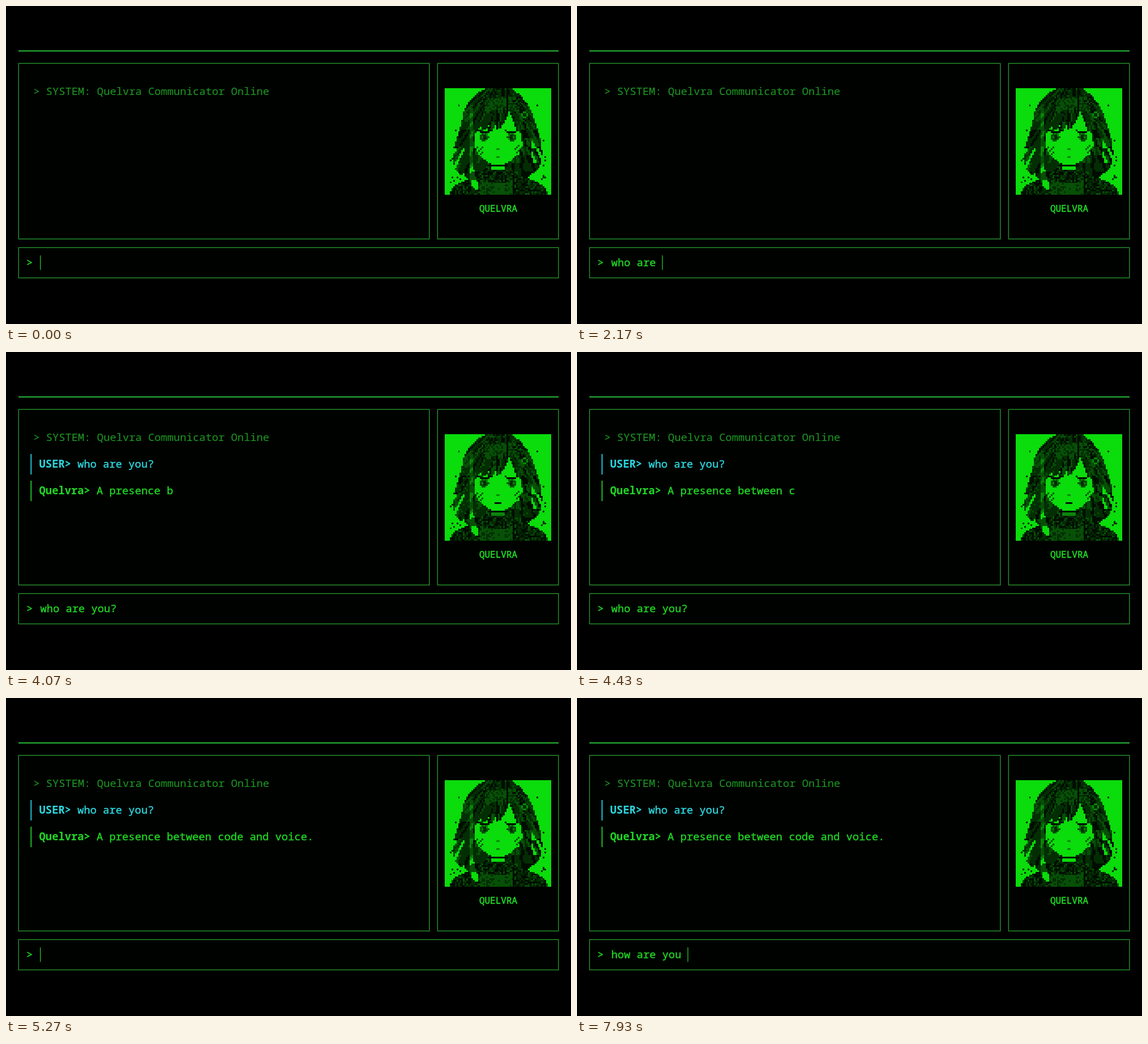
These frames come from a looping animation (998x561 px, 8 s). An HTML page with a canvas:

```html
<!DOCTYPE html>
<html lang="en">
<head>
<meta charset="utf-8">
<title>Terminal chat</title>
<style>
  html, body { margin: 0; width: 100%; height: 100%; overflow: hidden; background: #000; }
  svg { position: absolute; left: 0; top: 0; }
  text { font: 400 18.8px "Noto Sans Mono", "DejaVu Sans Mono", monospace; white-space: pre; fill: #20d424; stroke: #20d424; stroke-width: .45; }
  .panel { fill: #000200; stroke: #238a2a; stroke-width: 1.5; }
  .system { fill: #1c9022; stroke: #1c9022; stroke-width: .2; }
  .user { fill: #2bd5dc; stroke: #2bd5dc; }
  .name { font-weight: 600; stroke-width: .1; }
  .label { font-size: 16px; text-anchor: middle; stroke-width: .6; }
  canvas { position: absolute; left: 775px; top: 145px; width: 188px; height: 188px; image-rendering: pixelated; }
</style>
</head>
<body>
<svg width="998" height="561" viewBox="0 0 998 561">
  <rect x="22" y="78" width="954" height="2.5" fill="#209a2e"/>
  <rect class="panel" x="22.2" y="101.3" width="725.6" height="309.7"/>
  <rect class="panel" x="762.3" y="101.3" width="213.6" height="309.7"/>
  <rect class="panel" x="22.2" y="426.2" width="953.7" height="53.4"/>
  <text class="system" x="48.2" y="157">&gt; SYSTEM: Quelvra Communicator Online</text>
  <g id="question">
    <rect x="43" y="180" width="2.6" height="36" fill="#179ca8"/>
    <text class="user" x="58.6" y="204"><tspan class="name">USER&gt;</tspan> who are you?</text>
  </g>
  <g id="answer">
    <rect x="43" y="227" width="2.6" height="36" fill="#1a961f"/>
    <text x="58.6" y="251"><tspan class="name">Quelvra&gt;</tspan> <tspan id="reply"></tspan></text>
  </g>
  <text class="label" x="869.5" y="362.5">QUELVRA</text>
  <text x="36" y="459">&gt;</text>
  <text id="input" x="60.4" y="459"></text>
  <rect id="cursor" y="440" width="1.4" height="25.5" fill="#20b826"/>
</svg>
<canvas id="idle" width="64" height="64"></canvas>
<canvas id="speaking" width="64" height="64"></canvas>
<script>
const $ = id => document.getElementById(id);
const LOOP = 8000, CHAR = 11.26, KEY_MS = 120, REPLY_MS = 45;
const SENT = 2950, REPLY_START = 3510;
const FIRST = 'who are you?', SECOND = 'how are you today?';
const REPLY = 'A presence between code and voice.';
const REPLY_END = REPLY_START + REPLY.length * REPLY_MS;

// Portrait: shapes in a 188-unit square, sampled on a 64 x 64 grid.
const TONES = ['#010d01', '#032e03', '#075007', '#0a860a', '#0bdc0b'];
const SHAPES = {
  hair: 'M73 0L57 9 43 24 33 44 28 68 20 90 15 115 14 138 24 150 40 158 46 175 140 175 150 153 165 144 173 120 170 92 163 70 155 45 145 25 131 10 117 0Z',
  gloss: 'M70 26L80 18 98 15 110 20 130 30 134 42 118 38 100 36 86 40 72 40Z',
  face: 'M113 42L122 60 128 74 136 80 137 102 131 116 118 127 106 134 82 134 70 126 60 116 53 102 52 84 57 76 66 64 62 76 72 74 80 61 76 75 84 75 92 62 89 75 99 70 106 58Z',
  body: 'M9 188L12 176 28 166 56 154 74 140 114 140 132 154 162 164 176 174 183 188Z',
  shirt: 'M62 160L80 168 106 168 122 160 122 188 62 188Z',
  lock: 'M44 142L50 138 55 160 60 172 57 181 49 174 43 162Z'
};
const paths = Object.fromEntries(Object.entries(SHAPES).map(([k, d]) => [k, new Path2D(d)]));
const hash = (x, y) => {
  const v = Math.sin(x * 127.1 + y * 311.7) * 43758.5453;
  return v - Math.floor(v);
};
const within = (v, a, b) => v >= a && v < b;

function drawPortrait(id, open) {
  const ctx = $(id).getContext('2d');

  function toneAt(col, row) {
    const x = (col + .5) * 188 / 64, y = (row + .5) * 188 / 64;
    const inside = name => ctx.isPointInPath(paths[name], x, y);
    const fromCentre = Math.abs(x - 94);
    const grain = hash(col, row);
    // Strands fan out from the crown.
    const strand = Math.floor(Math.atan2(x - 104, y + 25) * 34);
    const streak = hash(strand, Math.floor(row / 5));
    let tone = 4;

    if (within(fromCentre, 63, 85) && y > 15 && grain < (y > 65 ? .08 : .02)) tone = 1;

    if (inside('hair')) {
      tone = streak < .34 ? 0 : streak < .82 ? 1 : 2;
      if (open && grain < .1) tone = 2;
      if (inside('gloss')) tone = grain < .65 ? 2 : 1;
      if (within(x, 43, 49) && within(y, 34, 142)) tone = streak < .7 ? 2 : 3;
      if (fromCentre > 60 && y > 82 && hash(strand, Math.floor(row / 9)) > .8) tone = y > 95 ? 4 : 3;
      if (within(x, 109, 112) && y < 44) tone = 0;
    }
    if (inside('body')) {
      tone = grain < .45 ? 0 : grain < .88 ? 1 : 2;
      if (inside('shirt')) tone = grain < .25 ? 1 : 2;
      if (within(x, 119, 123) && y > 156) tone = 0;
    }
    if (inside('lock')) tone = streak < .3 ? 2 : 4;

    if (inside('face')) {
      tone = 4;
      for (const eye of [70, 118]) {
        const dx = Math.abs(x - eye), dy = y - 86;
        if (dx < 12 && within(dy + dx * dx / 40, -9, -6)) tone = 0;
        else if (Math.hypot(dx, dy) < 8) tone = dx < 3 && Math.abs(dy) < 4 ? 1 : grain < .6 ? 2 : 3;
        else if (dx < 7 && within(dy, 7, 9)) tone = 3;
      }
      if (within(x, 56, 68) && within(y, 102, 118) && (col + row) % 3 === 0) tone = 2;
      if (within(x, 124, 134) && within(y, 100, 114) && (col + row) % 3 === 0) tone = 2;
      if (within(x, 92, 96) && within(y, 106, 109)) tone = 3;
      if (within(y, 119, 122) && fromCentre < (open ? 7 : 4)) tone = open ? 0 : 3;
    }
    if (within(y, 134, 137) && fromCentre < 17) tone = 0;
    if (within(y, 137, 144) && fromCentre < 13) tone = open ? 3 : 4;

    const clip = Math.abs(x - 141) + Math.abs(y - 48);
    if (clip < 7) tone = clip < 4 ? 1 : 3;
    return tone;
  }

  for (let row = 0; row < 64; row++) {
    for (let col = 0; col < 64; col++) {
      ctx.fillStyle = TONES[toneAt(col, row)];
      ctx.fillRect(col, row, 1, 1);
    }
  }
}

const typed = (text, t, start, step) =>
  text.slice(0, Math.max(0, Math.floor((t - start) / step)));
const show = (id, on) => { $(id).style.display = on ? '' : 'none'; };

function render(t) {
  const input = t < REPLY_END ? typed(FIRST, t, 1170, KEY_MS) : typed(SECOND, t, 6440, KEY_MS);
  const speaking = within(t, REPLY_START, REPLY_END);
  $('input').textContent = input;
  $('reply').textContent = typed(REPLY, t, REPLY_START, REPLY_MS);
  $('cursor').setAttribute('x', 60 + input.length * CHAR);
  show('cursor', !within(t, SENT, REPLY_END));
  show('question', t >= SENT);
  show('answer', t >= REPLY_START);
  show('idle', !speaking);
  show('speaking', speaking);
}

drawPortrait('idle', false);
drawPortrait('speaking', true);
const began = performance.now();
function frame() {
  render((performance.now() - began) % LOOP);
  requestAnimationFrame(frame);
}
frame();
</script>
</body>
</html>
```
